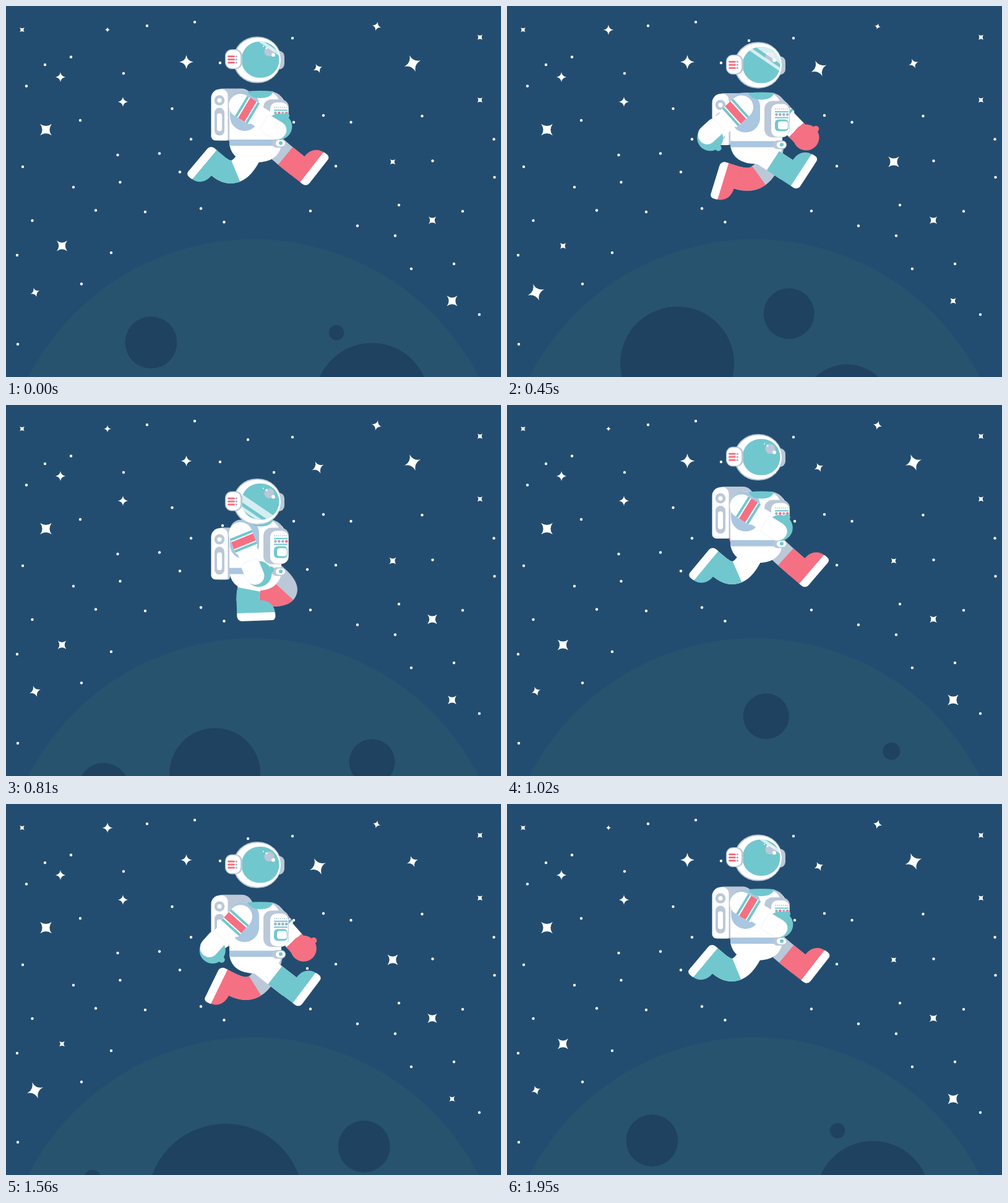
Recreate the animation shown at these times as an HTML page with a canvas. Size 800x600 px, loop 1980 ms.

```html
<!DOCTYPE html>
<html lang="en">
<head>
<meta charset="utf-8">
<title>Moon run</title>
<style>
html, body { margin: 0; width: 100%; height: 100%; overflow: hidden; background: #234d70; }
canvas { display: block; }
</style>
</head>
<body>
<canvas id="stage" width="800" height="600"></canvas>
<script>
const c = document.getElementById('stage').getContext('2d');
const WHITE = '#fff', GRAY = '#bbc8d8', TEAL = '#71c7ce', RED = '#f57082', BLUE = '#aac6e0';
const STEP = 30, FRAMES = 66, TAU = Math.PI * 2, RAD = Math.PI / 180;

const dots = [[228,32],[305,26],[463,52],[346,92],[391,56],[433,109],[63,95],[105,82.5],[190,109],
  [33,129.5],[268.5,166],[120,185],[350,195],[465,188],[513,177],[557.5,188],[672.5,178],[299,215.5],
  [180.5,241],[248,238.5],[788.5,215.5],[689.5,250.5],[533,259],[487,266],[281,268.5],[27,260],
  [184.5,285],[109,293],[789.5,277],[145,330.5],[225,333],[315,327.5],[352.5,349.5],[492,331.5],
  [635,322],[738,332],[42.5,347],[568,355.5],[629,371.5],[18,403],[170,399],[122,449.5],[724,417],
  [655,425],[765,499],[19,547],[397.5,260.5]];

// x, y, tilt, mean size, swing, step of the largest size
const stars = [
  [164,38.5,0,6.2,2.2,18], [291.5,90.5,0,11,3,7.5], [88,115,0,8,0,0], [189,155,0,8,0,0],
  [599,33,15,6.4,2,27], [504,101,-25,11,3.3,18], [657,93,-20,11.2,3.2,-2], [47,463,-20,11,3.3,16.5],
  [26,38.5,45,5.4,0,0], [766,50.5,45,5.9,0,0], [766,152,45,5.9,0,0], [64.5,200,45,13.2,0,0],
  [90.5,388,45,9.2,3,2.5], [625,252,45,9.2,3.1,16.5], [689,346.5,45,8.9,2.7,23.5], [721,477,45,9.2,3,2]];

// angle, distance from the planet's centre, radius
const craters = [[-34.4,293,42], [27.5,290.5,12.3], [52.1,242.6,92], [94,293.8,41],
  [131.4,200,73.5], [192.1,283.2,37], [232.7,316.5,14], [270.4,150,126]];

const keyTimes = [0, 7, 11, 15, 19, 23, 27];
const nearArm = [59, 27, -10, -48, -42, -10, 22];
const farArm = [-52, -16, 15, 44, 41, 14, -14];
// ankle x and y, foot angle, knee reach
const nearLeg = [[344,371,383,452,458.5,406,391], [122,134,123,124,136,143,131],
  [-130,-120,-96,57,53,8,2], [42,38,70,28,30,28,20]];
const farLeg = [[471,430,421,372,368,400,413], [120,146,129,137,134,130,121],
  [52,3,2,-107,-116,-118,-96], [28,28,20,50,50,40,70]];

// Smooth periodic interpolation that never overshoots its keys
function pose(values, k) {
  const n = keyTimes.length;
  const time = i => keyTimes[(i + n) % n] + 32 * Math.floor(i / n);
  const val = i => values[(i + n) % n];
  const rate = i => (val(i + 1) - val(i)) / (time(i + 1) - time(i));
  const slope = i => {
    const a = rate(i - 1), b = rate(i);
    return a * b <= 0 ? 0 : 2 * a * b / (a + b);
  };
  k %= 32;
  let i = n - 1;
  while (keyTimes[i] > k) i--;
  const h = time(i + 1) - time(i), u = (k - time(i)) / h, v = 1 - u;
  return v * v * (1 + 2 * u) * val(i) + u * u * (3 - 2 * u) * val((i + 1) % n)
    + h * u * v * (v * slope(i) - u * slope((i + 1) % n));
}

const wave = (k, peak, period) => Math.cos(TAU * (k - peak) / period);

function fill(color, path) {
  c.fillStyle = color;
  c.fill(new Path2D(path));
}
function box(color, x, y, w, h, r = 0) {
  c.fillStyle = color;
  c.beginPath();
  c.roundRect(x, y, w, h, r);
  c.fill();
}
function disc(color, x, y, r) {
  c.fillStyle = color;
  c.beginPath();
  c.arc(x, y, r, 0, TAU);
  c.fill();
}
function at(x, y, degrees, draw) {
  c.save();
  c.translate(x, y);
  c.rotate(degrees * RAD);
  draw();
  c.restore();
}

function sky(k) {
  c.fillStyle = '#234d70';
  c.fillRect(0, 0, 800, 600);
  for (const [x, y] of dots) disc(WHITE, x, y, 2.2);
  for (const [x, y, tilt, mean, swing, peak] of stars) {
    const s = mean + swing * wave(k, peak, 32);
    at(x, y, tilt, () => {
      c.scale(s, s);
      fill(WHITE, 'M0-1Q.13-.13 1 0Q.13.13 0 1Q-.13.13-1 0Q-.13-.13 0-1Z');
    });
  }
}

function planet(frame) {
  disc('#28536f', 400, 786, 408.7);
  at(400, 786, -frame * 360 / 65, () => {
    for (const [angle, dist, r] of craters)
      disc('#1f4260', dist * Math.sin(angle * RAD), -dist * Math.cos(angle * RAD), r);
  });
}

function leg(hipX, hipY, top, keys, k, thigh, boot) {
  const [x, dy, angle, reach] = keys.map(v => pose(v, k));
  const y = top + dy, t = .55;
  const kneeX = x - reach * Math.sin(angle * RAD), kneeY = y - reach * Math.cos(angle * RAD);
  const mix = (a, b) => a + (b - a) * t;
  const inX = mix(hipX, kneeX), inY = mix(hipY, kneeY);
  const outX = mix(kneeX, x), outY = mix(kneeY, y);
  const curve = (color, ...p) => {
    c.strokeStyle = color;
    c.beginPath();
    c.moveTo(p[0], p[1]);
    c.quadraticCurveTo(p[2], p[3], p[4], p[5]);
    c.stroke();
  };
  c.lineWidth = 37;
  curve(thigh, hipX, hipY, kneeX, kneeY, x, y);
  curve(boot, mix(inX, outX), mix(inY, outY), outX, outY, x, y);
  at(x, y, -angle, () => {
    box(boot, -18.5, -1, 37, 22);
    fill(boot, 'M17 0C34-1 43 10 43 21H-18Z');
    box(WHITE, -18.5, 20, 62, 13, [0, 2, 6, 8]);
  });
}

function sleeve() {
  box(WHITE, -19, -19, 38, 48, [19, 19, 4, 4]);
  box(WHITE, -16.5, 20, 33, 34);
  box(TEAL, -19, 1, 38, 4);
  box(RED, -19, 7, 38, 12);
  box(TEAL, -19, 21, 38, 4);
}
function glove(color) {
  disc(color, 3, 71, 21);
  box(color, 4, 67, 25, 10, 5);
}

function backpack(y) {
  box(GRAY, 333, y, 66, 60, 18);
  box(GRAY, 340, y + 30, 22, 54, 4);
  box(WHITE, 331.5, y + 1, 27, 83, [14, 10, 3, 7]);
  disc(GRAY, 345, y + 19, 8.3);
  disc(WHITE, 345, y + 19, 3.6);
  box(GRAY, 337, y + 31, 16, 45, 8);
  box(WHITE, 341, y + 40, 8, 29, 4);
}

function torso(y) {
  at(0, y, 0, () => {
    fill(GRAY, 'M400 0H428Q449 3 449 24V50H400Z');
    fill(WHITE, 'M361 24Q361 0 385 0H424Q443 4 445 30V88Q439 115 404 115Q366 115 361 86Z');
    box(BLUE, 362, 0, 47, 64, [18, 22, 24, 24]);
    fill(TEAL, 'M390 0Q411-2 432 0Q428 11 411 11Q395 11 390 0Z');
  });
}

function gear(y, k) {
  box(BLUE, 361, y + 78, 84, 10);
  box(GRAY, 430, y + 77, 22, 14, 7);
  box(WHITE, 436, y + 79, 15, 10, 5);
  disc(TEAL, 444, y + 83.7, 3);

  box(GRAY, 416, y + 13, 41, 59, 13);
  box(WHITE, 427, y + 18, 29, 53, 10);
  for (let x = 434; x < 455; x += 3.2) disc(GRAY, x, y + 26, 1);
  box(TEAL, 433, y + 29.5, 22, 2);
  for (let i = 0; i < 4; i++) {
    const lit = i % 2 && (k < 12 || (i === 3 && k > 23) || k > 30);
    disc(lit ? RED : '#9fb0c4', 435.5 + i * 5.9, y + 35, 2.3);
  }
  box(TEAL, 433, y + 39, 22, 2);
  box(TEAL, 433, y + 43, 22, 19, 6);
  box(WHITE, 438, y + 46, 16, 13, 4);
}

function head(y, k) {
  at(0, y, 0, () => {
    box(GRAY, 430, 23, 20, 30, 9);
    box(GRAY, 367, 0, 78, 75, 37.5);
    box(WHITE, 369, 2, 75, 71, 35.5);

    c.save();
    c.beginPath();
    c.roundRect(380.5, 8, 61, 58.5, 29);
    c.clip();
    box(TEAL, 380, 7, 63, 61);
    disc(GRAY, 425.5, 24, 8);
    disc(WHITE, 432, 29.5, 3);
    disc(WHITE, 421, 18.7, 1.7);
    disc(WHITE, 416, 15.7, 1);
    const slide = -44 * wave(k, 3, 16);
    for (const [offset, thick] of [[8, 13], [24, 6]]) {
      const left = offset + slide - thick / 2 - 28;
      fill('rgba(255,255,255,.7)', `M370 ${left}l80 54.4v${thick}l-80-54.4z`);
    }
    c.restore();

    box(GRAY, 354, 20.5, 28, 32, 11);
    box(WHITE, 355.5, 22, 23.5, 29, 9);
    for (const row of [32, 37, 42]) {
      box(RED, 358, row - 1.5, 12, 3, 1.5);
      disc(row === 37 ? TEAL : '#9fb0c4', 372.3, row, 1.6);
    }
  });
}

function astronaut(k) {
  const y = 172.3 - 34.3 * wave(k, 0, 16);
  at(432, y + 23, -pose(farArm, k), () => {
    sleeve();
    box(RED, -16.5, 51, 33, 20);
    glove(RED);
  });
  leg(429, y + 85, y, farLeg, k, GRAY, RED);
  backpack(172.5 - 40.7 * wave(k, .75, 16));
  torso(y);
  leg(400, y + 90, y, nearLeg, k, WHITE, TEAL);
  gear(y, k);
  at(379, y + 23, -pose(nearArm, k), () => {
    sleeve();
    glove(TEAL);
    box(WHITE, -19, 46, 30, 40, [6, 3, 14, 16]);
    c.strokeStyle = '#e9eff6';
    c.lineWidth = .7;
    c.stroke();
  });
  head(90 - 43 * wave(k, .88, 16), k);
}

function draw() {
  const frame = Math.floor(performance.now() / STEP) % FRAMES;
  const k = frame % 33; // the run holds its first pose for two steps
  sky(k);
  planet(frame);
  astronaut(k);
  requestAnimationFrame(draw);
}
draw();
</script>
</body>
</html>
```
